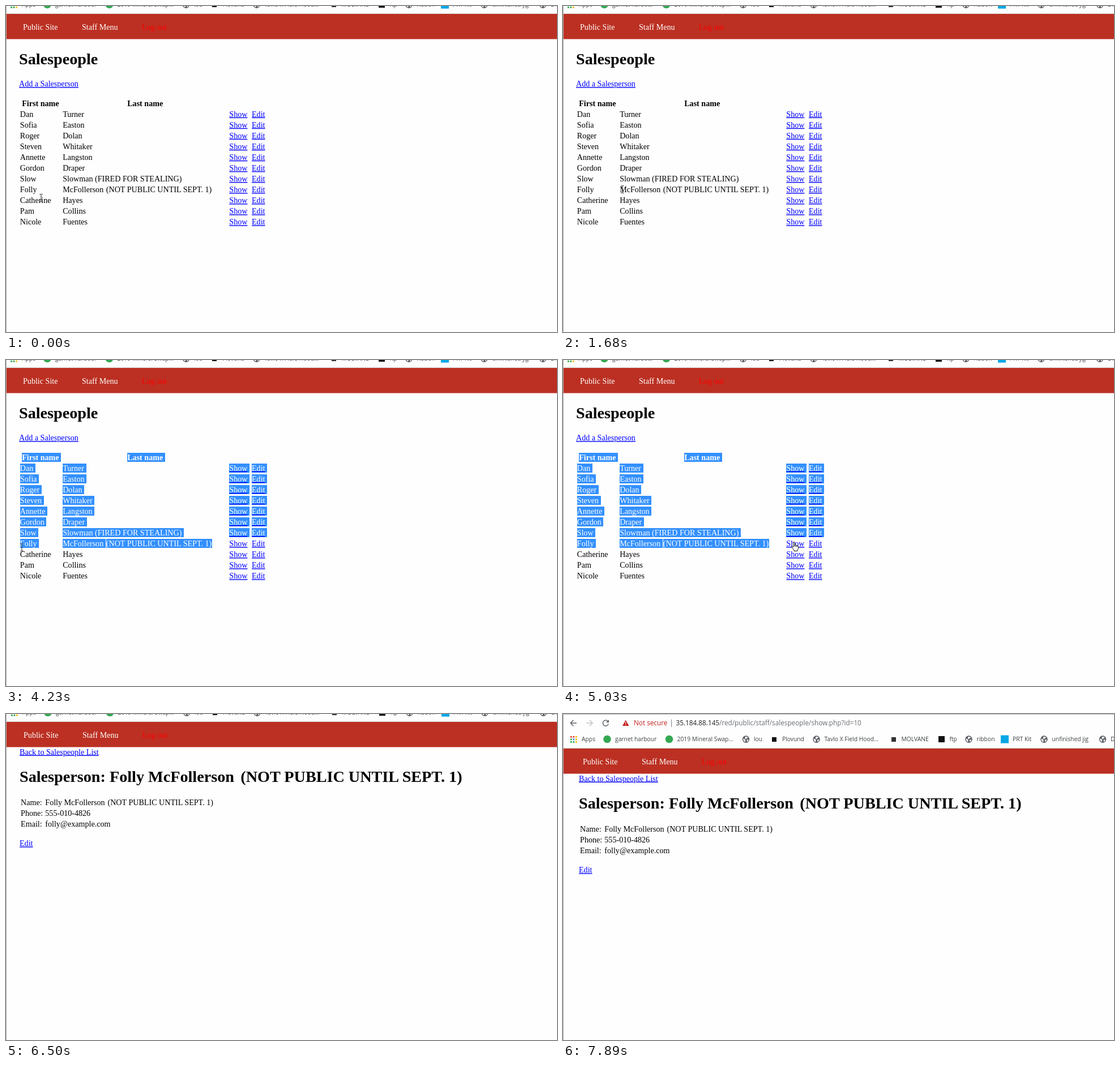
Animation, 973 px wide and 576 px high, one loop 8000 ms. Source, as an HTML page:

```html
<!DOCTYPE html>
<html lang="en">
<head>
<meta charset="utf-8">
<title>Staff pages</title>
<style>
  html, body { margin: 0; width: 100%; height: 100%; overflow: hidden; background: #fefefe; }
  svg { display: block; width: 973px; height: 576px; }
  text { white-space: pre; }
  .serif { font: 14.1px "Liberation Serif", serif; }
  .ui { font: 10.3px "Open Sans", "Noto Sans", sans-serif; fill: #3c4043; }
  .url { font-size: 11.75px; }
  .b { font-weight: bold; }
  .h1 { font-weight: bold; font-size: 28.2px; }
  .link { fill: #00f; text-decoration: underline; }
  .lit tspan { fill: #fff; }
  .lit rect { fill: #3390ff; shape-rendering: crispEdges; }
</style>
</head>
<body>
<svg viewBox="0 0 973 576">
  <defs><clipPath id="span"><rect id="spanBox" y="310" height="26"/></clipPath></defs>
  <rect width="973" height="576" fill="#fefefe"/>
  <g id="chrome" class="ui"></g>
  <g id="nav" class="serif">
    <rect x="-20" y="14" width="1020" height="44.5" fill="#bb3022"/>
  </g>
  <g id="list" class="serif">
    <g id="plain"></g>
    <g id="litRows" class="lit"></g>
    <g id="litLast" class="lit" clip-path="url(#span)"></g>
  </g>
  <g id="show" class="serif"></g>
  <rect id="topLine" width="973" height="1" fill="#b4b4b4"/>
  <rect width="1" height="576" fill="#b0b0b0"/>
  <g id="cursors" stroke="#000" stroke-linejoin="round">
    <path id="beam" fill="none" stroke="#222" d="M-2.5-6.5H-.7L0-5.8.7-6.5H2.5M0-5.8V5.8M-2.5 6.5H-.7L0 5.8.7 6.5H2.5"/>
    <path id="arrow" fill="#fff" stroke-width=".8" d="M.5.5V12L3.2 9.5 5 13.6 6.8 12.8 5 8.8H9Z"/>
    <path id="hand" fill="#fff" stroke-width=".9" d="M4 9V1.8Q4 .5 5.1 .5T6.2 1.8V6Q8.2 5 8.5 6.6 10.2 5.8 10.6 7.3 12.5 6.9 12.5 8.6V11.5Q12.3 13.5 11 14.8V16.5H5V15L1 9.8Q.2 8.2 1.6 8 2.6 8 4 10M6.2 6V9M8.5 6.6V9M10.6 7.3V9.3"/>
  </g>
</svg>
<script>
const LOOP = 8000, PITCH = 19.06, HEAD_Y = 176.6;
const $ = id => document.getElementById(id);

function add(parent, tag, attrs, content) {
  const el = document.createElementNS("http://www.w3.org/2000/svg", tag);
  for (const k in attrs) el.setAttribute(k, attrs[k]);
  if (content) el.textContent = content;
  return parent.appendChild(el);
}
const text = (parent, x, y, content, cls = "", fill = "") =>
  add(parent, "text", { x, y, class: cls, style: fill && `fill:${fill}` }, content);

// Browser toolbar
const bar = $("chrome");
const line = (d, stroke, width = 1.5) => add(bar, "path", { d, stroke, "stroke-width": width, fill: "none" });
const square = (x, y, size, fill) => add(bar, "rect", { x, y, width: size, height: size, fill });
const dot = (cx, cy, r, fill) => add(bar, "circle", { cx, cy, r, fill });

function globe(x) {
  dot(x, 39.6, 6.3, "#5f6368");
  add(bar, "path", { fill: "#fff", d: `M${x - 4.8} 38.6l3 1.2 1 2-1 2.6q-3.4-2-3-5.8M${x - 1} 35l3.6 .4 1 1.8-2.4 .6-.8 1.6-2-1zM${x + 1.4} 40.4l3.4 .2q-.6 2.6-2.6 3.6z` });
}

line("M21 11H10.5M15.5 5.8L10.3 11l5.2 5.2", "#5f6368");
line("M38.5 11H49M44 5.8L49.2 11 44 16.2", "#c3c5c8");
line("M76 7.6A5 5 0 1 0 77.2 12.4", "#5f6368");
add(bar, "path", { d: "M78 5v5h-5z", fill: "#5f6368" });
add(bar, "path", { d: "M107.7 5.8L113.5 16H102z", fill: "#c5221f" });
line("M107.7 9v3.4M107.7 13.4v1.3", "#fff", 1.2);
text(bar, 122, 15.4, "Not secure", "url", "#c5221f");
line("M188.5 4.5V18", "#85888c", 1);
const host = text(bar, 196.5, 15.4, "35.184.88.145", "url", "#202124");
add(host, "tspan", { style: "fill:#6a6e73" }, "/red/public/staff/salespeople/show.php?id=10");

const appTints = ["#ea4335", "#ea4335", "#fbbc04", "#34a853", "#4285f4", "#fbbc04", "#34a853", "#34a853", "#fbbc04"];
appTints.forEach((c, i) => square(10 + i % 3 * 4.5, 34 + Math.floor(i / 3) * 4.5, 2.8, c));
[75, 184.5].forEach(x => dot(x, 39.5, 6.8, "#34a853"));
[320, 444.5, 713.5, 846.5, 950].forEach(globe);
square(366, 36, 8, "#111");
square(577, 36, 8, "#333");
square(660, 34, 11, "#111");
square(770, 32.6, 14, "#08a7e6");
[[30, "Apps"], [89, "garnet harbour"], [198.5, "2019 Mineral Swap..."], [334, "lou"], [384, "Plovund"],
 [458.5, "Tavlo X Field Hood..."], [594.5, "MOLVANE"], [679.5, "ftp"], [727.5, "ribbon"],
 [791, "PRT Kit"], [860.5, "unfinished jig"], [964, "DR"]].forEach(([x, s]) => text(bar, x, 43.2, s));
line("M-20 55.5H1000", "#d5d5d5", 1);

// Page header
[[30, "Public Site", "#fff"], [134, "Staff Menu", "#fff"], [240, "Log out", "#f00"]]
  .forEach(([x, s, fill]) => text($("nav"), x, 41.6, s, "", fill));

// List page
const NOTE = "(NOT PUBLIC UNTIL SEPT. 1)";
const people = [
  ["Dan", "Turner"], ["Sofia", "Easton"], ["Roger", "Dolan"], ["Steven", "Whitaker"],
  ["Annette", "Langston"], ["Gordon", "Draper"], ["Slow", "Slowman (FIRED FOR STEALING)"],
  ["Folly", "McFollerson"], ["Catherine", "Hayes"], ["Pam", "Collins"], ["Nicole", "Fuentes"]
];
const MARKED = 7;
const FULL_NAME = people[MARKED].join(" ");

// The lit copy keeps the link's blue underline beneath white letters
function cell(x, y, s, cls, litLayer) {
  const el = text($("plain"), x, y, s, cls);
  if (!litLayer) return;
  const width = el.getComputedTextLength() + 3.5;
  add(litLayer, "rect", { x, y: y - 12.8, width, height: 16.2 });
  add(text(litLayer, x, y, "", cls), "tspan", {}, s);
}

text($("plain"), 23, 103, "Salespeople", "h1");
text($("plain"), 23, 142.2, "Add a Salesperson", "link");
cell(28.2, HEAD_Y, "First name", "b", $("litRows"));
cell(214.2, HEAD_Y, "Last name", "b", $("litRows"));
people.forEach(([first, last], i) => {
  const y = HEAD_Y + PITCH * (i + 1);
  const rowLit = i < MARKED ? $("litRows") : null;
  const nameLit = i === MARKED ? $("litLast") : rowLit;
  cell(24.8, y, first, "", nameLit);
  cell(100.2, y, last, "", nameLit);
  if (i === MARKED) cell(176.8, y, NOTE, "", nameLit);
  cell(394.3, y, "Show", "link", rowLit);
  cell(434, y, "Edit", "link", rowLit);
});

// Detail page
const show = $("show");
text(show, 23, 71.6, "Back to Salespeople List", "link");
text(show, 23, 119.6, `Salesperson: ${FULL_NAME}`, "h1");
text(show, 413.3, 119.6, NOTE, "h1");
[["Name:", FULL_NAME], ["Phone:", "555-010-4826"], ["Email:", "folly@example.com"]].forEach(([k, v], i) => {
  const y = 160.6 + i * PITCH;
  text(show, 25.1, y, k);
  text(show, 68.3, y, v);
});
text(show, 178.5, 160.6, NOTE);
text(show, 23, 233.2, "Edit", "link");

// Pointer: time, shape, x, y
const pointer = [
  [0, "beam", 62, 339], [130, "beam", 41, 338], [260, "arrow", 15, 329], [410, "arrow", 13, 327],
  [550, "arrow", 20, 327], [700, "arrow", 21, 327], [990, "beam", 44.5, 327], [1290, "beam", 48.5, 328],
  [1440, "beam", 54, 328], [1560, "beam", 78, 326], [1680, "beam", 105, 324], [1800, "beam", 192, 321],
  [1920, "beam", 284.5, 319], [2080, "beam", 326, 322], [2210, "beam", 350, 324], [2360, "arrow", 366, 324],
  [2820, "beam", 346, 329], [2950, "beam", 328, 328], [3090, "beam", 282, 328], [3220, "beam", 232, 328],
  [3340, "beam", 194, 329], [3480, "beam", 160, 331], [3600, "beam", 124, 334], [3720, "beam", 92, 336],
  [3840, "beam", 67, 338], [3960, "beam", 49.5, 331], [4110, "beam", 38, 331], [4230, "beam", 28, 331],
  [4350, "beam", 23.5, 331], [4760, "beam", 214, 320], [4880, "hand", 394, 315], [5030, "hand", 403, 321],
  [5170, "hand", 404, 320], [5290, "hand", 404, 322], [5440, "hand", 404, 324], [5910, "", 0, 0],
  [6060, "hand", 404, 324], [6500, "", 0, 0]
];
// Page offset: time, dx, dy
const scroll = [[0, 0, 0], [6350, 1, 0], [7330, 2, 42], [7460, 4, 46], [7890, 5, 47]];

const at = (keys, t) => keys.findLast(k => k[0] <= t);
const toggle = (id, on) => $(id).setAttribute("display", on ? "inline" : "none");

// Selected stretch of the marked row, and whether all rows above are selected
function selection(t, x) {
  if (t >= 990 && t < 1440) return [true, 0, x];
  if (t >= 2820 && t < 4230) return [false, x + 8, 364];
  if (t >= 4230 && t < 6350) return [true, 0, 364];
  return [false, 0, 0];
}

function draw(t) {
  const [, shape, x, y] = at(pointer, t);
  const [, dx, dy] = at(scroll, t);
  const [rows, from, to] = selection(t, x);

  bar.setAttribute("transform", `translate(${dx - 2} ${dy - 42})`);
  for (const id of ["nav", "show"]) $(id).setAttribute("transform", `translate(${dx} ${dy})`);
  toggle("list", t < 6350);
  toggle("show", t >= 6350);
  toggle("topLine", t >= 7460);

  toggle("litRows", rows);
  toggle("litLast", to > from);
  $("spanBox").setAttribute("x", from);
  $("spanBox").setAttribute("width", Math.max(0, to - from));

  for (const id of ["beam", "arrow", "hand"]) toggle(id, id === shape);
  $("cursors").setAttribute("transform", `translate(${x} ${y})`);
}

function tick() {
  draw(performance.now() % LOOP);
  requestAnimationFrame(tick);
}
tick();
</script>
</body>
</html>
```
